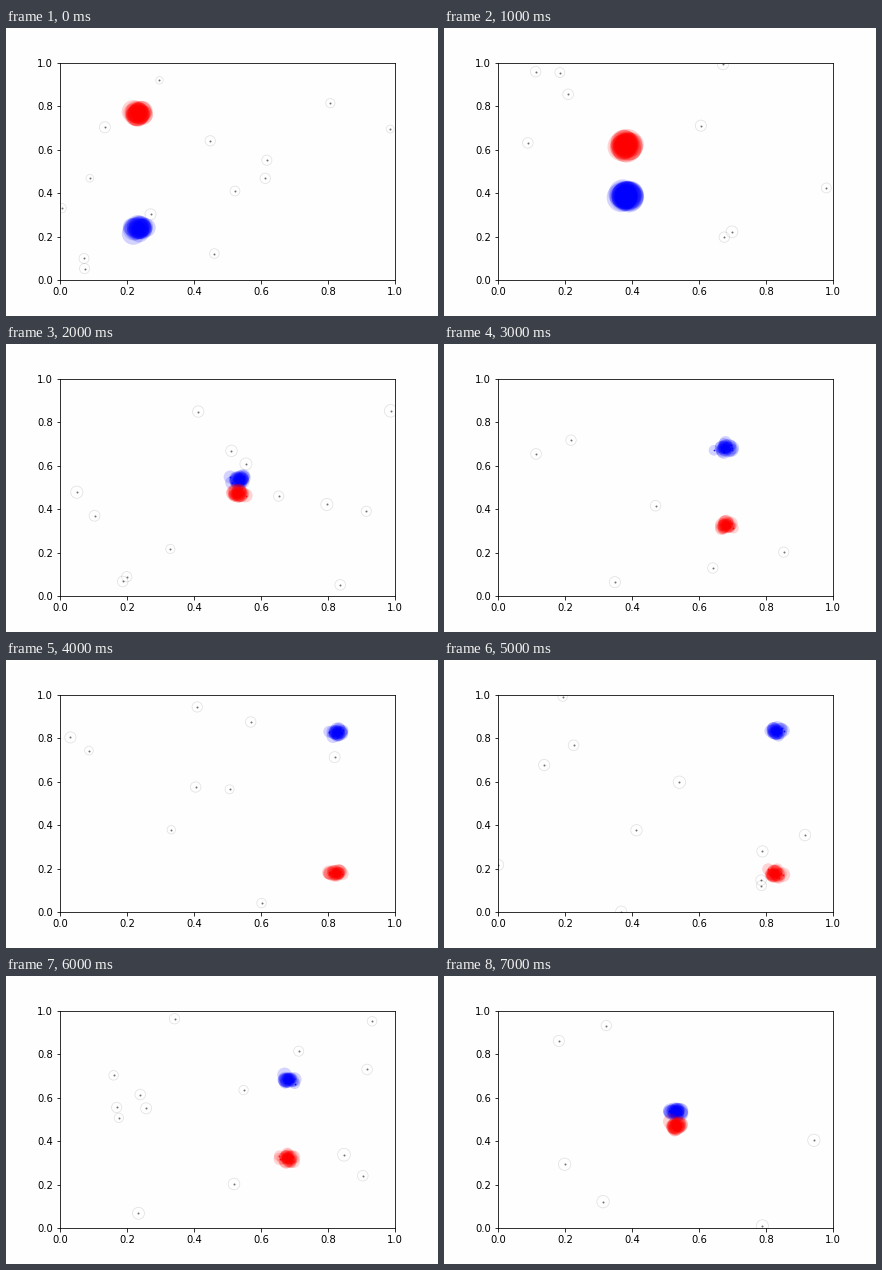
Animation, 432 px wide and 288 px high, one loop 8000 ms. Source, as a matplotlib script:

```python
import numpy as np
import matplotlib.pyplot as plt
from matplotlib.animation import FuncAnimation

FRAMES = 8
LAST_LEG = 4
MEMBERS = 26
SPREAD = .009
RADIUS = [11, 14.3, 7.6, 7, 7]    # disc size in pixels on each leg
PAPER = "#fefefe"

plt.rcParams.update({"font.family": "DejaVu Sans", "font.size": 10})
fig = plt.figure(figsize=(6, 4), dpi=72, facecolor=PAPER)
fig.subplots_adjust(left=.125, right=.9, bottom=.125, top=.88)
ax = fig.add_subplot(facecolor=PAPER)
ax.set(xlim=(0, 1), ylim=(0, 1))


def discs(xy, r, **style):
    """Circles with pixel radius r (one point is one pixel here)."""
    ax.scatter(*xy.T, s=(2 * np.asarray(r)) ** 2, **style)


def noise(rng):
    """Sparse background points, each in a faint ring."""
    n = rng.integers(6, 16)
    xy = rng.uniform(0, 1, (n, 2))
    r = rng.uniform(4.8, 6.2) + rng.normal(0, .4, n)
    discs(xy, r, facecolors="none", edgecolors="black", alpha=.11, lw=.8)
    discs(xy, 1, color="black", alpha=.55, lw=0)


def cluster(rng, center, radius, color):
    """Overlapping translucent discs scattered around a moving center."""
    xy = rng.normal(center, SPREAD, (MEMBERS, 2))
    discs(xy, radius * rng.uniform(.75, 1.05, MEMBERS),
          color=color, alpha=.17, lw=0)
    discs(xy, .9, color=color, alpha=.8, lw=0)


def update(i):
    for c in list(ax.collections):
        c.remove()
    rng = np.random.default_rng(20 + i)
    # Out along the diagonals, one pause at the far end, then back.
    leg = min(i, 2 * LAST_LEG + 1 - i)
    x = .236 + .148 * leg
    noise(rng)
    cluster(rng, (x, x + .002), RADIUS[leg], "blue")
    cluster(rng, (x, 1.003 - x), RADIUS[leg], "red")
    return ax.collections


anim = FuncAnimation(fig, update, frames=FRAMES, interval=1000, repeat=True,
                     repeat_delay=0, init_func=lambda: [], blit=False)
plt.show()
```
